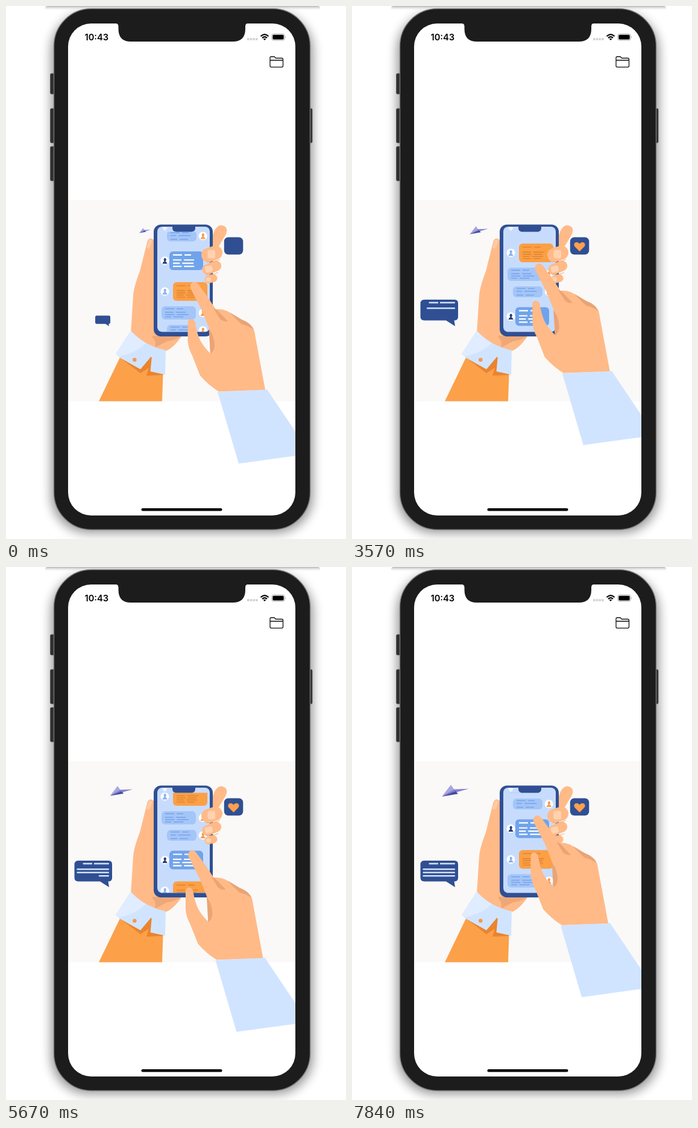
These frames come from a looping animation (564x884 px, 7910 ms). An HTML page:

```html
<!DOCTYPE html>
<html lang="en">
<head>
<meta charset="utf-8">
<title>Chat animation</title>
<style>
  html, body { margin: 0; width: 100%; height: 100%; overflow: hidden; background: #fff; }
  svg { display: block; }
  .time { font: 600 14.6px Inter, sans-serif; }
  .skin { fill: #ffba88; }
  .shade { fill: #eaa475; }
  .navy { fill: #304f93; }
  .cuff { fill: #d1e4ff; }
  .finger { stroke: #ffba88; stroke-linecap: round; }
  .line { stroke: #cfe1ff; stroke-width: 2.6; stroke-linecap: round; }
</style>
</head>
<body>
<svg width="564" height="884" viewBox="0 0 564 884">
  <defs>
    <filter id="blur" x="-20%" y="-20%" width="140%" height="140%"><feGaussianBlur stdDeviation="9"/></filter>
    <linearGradient id="top" x2="0" y2="1"><stop stop-color="#b5b5b5"/><stop offset="1" stop-color="#fff" stop-opacity="0"/></linearGradient>
    <clipPath id="stage"><path d="M103 29H480V793H103Z"/></clipPath>
    <clipPath id="glass"><path d="M251 374.5H338V540H251Z"/></clipPath>
  </defs>

  <!-- device -->
  <rect x="75" y="12" width="434" height="862" rx="62" opacity=".42" filter="url(#blur)"/>
  <rect x="65" width="456" height="8" rx="4" fill="url(#top)"/>
  <g fill="#303030" stroke="#555" stroke-width=".8">
    <rect x="73.5" y="112" width="8" height="34" rx="2"/>
    <rect x="73.5" y="170" width="8" height="57" rx="2"/>
    <rect x="73.5" y="233" width="8" height="57" rx="2"/>
    <rect x="500" y="170" width="8" height="57" rx="2"/>
  </g>
  <rect x="79.5" y="4.5" width="425" height="864" rx="62" fill="#1c1c1c" stroke="#777" stroke-width="1.4"/>
  <rect x="103" y="29" width="377" height="816" rx="38" fill="#fff"/>
  <path d="M182 28V29Q186.500 29 186.500 34V38Q186.500 59 207 59H376Q397 59 397 38V34Q397 29 401 29V28Z" fill="#1c1c1c"/>

  <!-- status bar -->
  <text class="time" x="130.5" y="57">10:43</text>
  <path d="M400 55H418" stroke="#d0d0d0" stroke-width="3.5" stroke-dasharray="3.5 1.2"/>
  <path d="M422.5 50.3Q429 44 435.5 50.3M425 53Q429 49.3 433 53" fill="none" stroke="#000" stroke-width="2.2"/>
  <path d="M426.7 54.6Q429 52.7 431.3 54.6L429 57Z"/>
  <rect x="440.8" y="46.3" width="21.4" height="10.6" rx="3" fill="none" stroke="#aaa"/>
  <rect x="442.3" y="47.8" width="18.4" height="7.6" rx="1.6"/>
  <path d="M463.3 50Q465 51.5 463.3 53.5Z" fill="#aaa"/>
  <path d="M438 99V86Q438 84 440 84H445L447.500 86.500H457.500Q459.500 86.500 459.500 88.500V99Q459.500 101.300 457.500 101.300H440Q438 101.300 438 99ZM438 90H459.500" fill="none" stroke="#111" stroke-width="1.3"/>
  <rect x="224.5" y="833" width="134" height="4.6" rx="2.3"/>

  <path d="M103 322H480V655.5H103Z" fill="#faf9f7"/>

  <!-- holding hand -->
  <path class="skin" d="M245 388Q238 382 234.500 390L222 440Q212 466 211 480L207 542L222 570L262 573Q276 570 291 548L260 520Z"/>
  <path d="M237 388Q242 386 243 390L238 402Q234 403 233 400Z" fill="#ffcba5"/>
  <path class="shade" d="M243 547H291Q280 555 268 556Q255 562 247 567Q250 556 243 550Z" opacity=".8"/>
  <path class="skin" d="M342 384Q347 364 357 363.5Q371 366 364 380L349 405L342 408Z"/>
  <path d="M189 583L154 655.5H259L260.5 610L236 590Z" fill="#fca04a"/>
  <path d="M189 583L223 609L237 600L233 613L261 612L240 580Z" fill="#ea842f"/>
  <path class="cuff" d="M207 538.500Q229 563 265 571L264 611.500L239.500 606L242 580L223 602.500L190 584L182 577Z"/>
  <path d="M207 538.500Q217 550 232 559Q216 575 189 581L182 577Z" fill="#e0ecff"/>
  <circle cx="213.3" cy="586.7" r="3.3" fill="#f39a50"/>

  <!-- handset -->
  <rect class="navy" x="245" y="362.5" width="98" height="185.5" rx="12"/>
  <rect x="251" y="366" width="87" height="174.5" rx="8" fill="#c7dcfd"/>
  <g clip-path="url(#glass)">
    <g id="chat"><g id="list"></g><use href="#list" y="156.5"/></g>
  </g>
  <path d="M276 365H314V368Q314 374.5 307 374.5H283Q276 374.5 276 368Z" class="navy"/>
  <path d="M263.5 373L259.5 369Q260 365.5 263.5 367Q267 365.5 267.5 369Z" fill="#edf4ff"/>
  <path class="finger" d="M335.5 413L347.5 409" stroke-width="23"/>
  <path class="finger" d="M334 437L348.5 431" stroke-width="17.5"/>
  <path class="finger" d="M336 453.5L344 451.5" stroke-width="13"/>
  <g fill="#ffd2b2">
    <rect x="334.5" y="404.500" width="12.500" height="14" rx="3"/>
    <rect x="330" y="431" width="12.500" height="10.500" rx="3" transform="rotate(-14 336 436)"/>
    <rect x="331.5" y="450" width="8.500" height="7" rx="3"/>
  </g>
  <path d="M332 424Q343 426 355 420M331 445Q341 447 352 442" fill="none" stroke="#efaa7b"/>

  <!-- floating items -->
  <g id="plane">
    <path d="M0 0L15 -19.5L21 -11Z" fill="#aaa5e2"/>
    <path d="M0 0L20 -12L45 -13L27 -8Z" fill="#8581d2"/>
    <path d="M0 0L23 -9L27 -4.5Z" fill="#3e509d"/>
  </g>
  <rect class="navy" x="361.8" y="383.5" width="31.5" height="28.7" rx="7"/>
  <path id="heart" d="M0 8L-8 0C-12 -6 -4 -10.5 0 -4.5C4 -10.5 12 -6 8 0Z" fill="#ff9f4e"/>
  <g id="bubble">
    <path class="navy" d="M120 487H170Q176 487 176 493V515.5Q176 521.5 169.5 521.5L171 531L156 521.5H120Q113.5 521.5 113.5 515V493.5Q113.5 487 120 487Z"/>
    <path class="line"/><path class="line"/><path class="line"/><path class="line"/>
    <path class="navy" d="M143 490H146V494.5H143Z"/>
  </g>

  <!-- tapping hand -->
  <g clip-path="url(#stage)"><g id="hand">
    <path class="cuff" d="M351 640L433 636L500 735.6V743.3L386 759Z"/>
    <path class="skin" d="M306 468C304 459 313 454 319 461.500Q334 481 348 503Q358 502 367 506L390 520Q412 528 413 545L430 636.500L353 639.500Q336 629 322 613L309 580Q302 567 301.500 555V527C301 517 312 517 314 526Q317 545 323 556Q330 568 339 576L337 535L325 505Z"/>
    <path class="shade" d="M336.5 535Q346 548 346 564Q345 573 339 577Z"/>
    <path class="shade" d="M344 501L351 505L368 523Q360 524 355 519ZM371 508L391 520Q407 526 411 537Q402 530 391 528Q382 520 371 508Z"/>
  </g></g>
</svg>
<script>
const LOOP = 7910, STEP = 70;
const $ = id => document.getElementById(id);
const lines = document.querySelectorAll('.line');

let seed = 7;
const random = () => (seed = seed * 16807 % 2147483647) / 2147483647;

// A chat bubble: a title row, then evenly spaced rows of two dashes
function message({ x, y, w, h, fill, ink, rows, weight, figure, avatarX }) {
  const row = (dy, a, b) => `M${x + 6} ${y + dy}h${a}m4 0h${b}`;
  let text = row(h * .19, 15, 11);
  for (let i = 0; i < rows; i++)
    text += row(h * (.46 + .34 * i / (rows - 1)), 9 + 7 * random(), 12 + 9 * random());
  return `<rect x="${x}" y="${y}" width="${w}" height="${h}" rx="6" fill="${fill}"/>
    <path d="${text}" stroke="${ink}" stroke-width="${weight}"/>
    <g transform="translate(${avatarX} ${y + h / 2})"><circle r="7" fill="#fff"/>
    <path d="M-4 5Q-3.5 2 -1 1L-2 -2Q-2 -4.5 .3 -4.5Q3 -4 2 -.5L1 1.2Q3.500 2 4 5Z" fill="${figure}"/></g>`;
}
const received = { avatarX: 263.5, h: 31 };
const sent = { avatarX: 326.7, fill: '#a3c5f8', ink: '#78a2e9', weight: 1.5, figure: '#f79b4b' };
$('list').innerHTML = [
  { ...sent, x: 267, y: 372.5, w: 49, h: 18, rows: 2 },
  { ...received, x: 271, y: 407, w: 56, fill: '#70a3eb', ink: '#fff', rows: 3, weight: 2.2, figure: '#293e79' },
  { ...received, x: 277, y: 458, w: 57, fill: '#fc9f45', ink: '#d9822f', rows: 4, weight: 1.3, figure: '#8bb0ee' },
  { ...sent, x: 258, y: 498, w: 57, h: 22, rows: 3 },
].map(message).join('');

// Progress from 0 to 1 between two times
const ramp = (t, from, to) => Math.max(0, Math.min(1, (t - from) / (to - from)));
const place = (id, transform) => $(id).setAttribute('transform', transform);

function draw(t) {
  // Two upward swipes drag the chat; the finger returns in between
  const swipe1 = ramp(t, 0, 1450), back = ramp(t, 3100, 4400), swipe2 = ramp(t, 4850, 7150);
  place('hand', `translate(${-5 * t / LOOP} ${-73 * swipe1 + 117 * back - 89.5 * swipe2})`);
  place('chat', `translate(0 ${-64 * swipe1 - 81 * swipe2})`);

  const flight = t / LOOP;
  place('plane', `translate(${221 - 72 * ramp(t, 1200, 7850)} ${376.5 + 4.3 * flight}) scale(${.42 + .58 * flight})`);
  place('heart', `translate(377.5 399) scale(${ramp(t, 1950, 2950)})`);
  place('bubble', `translate(171 531) scale(${.4 + .6 * ramp(t, 0, 840)}) translate(-171 -531)`);

  // Bubble text is written from right to left, line by line
  lines.forEach((line, i) => {
    const start = 890 + 1460 * i, p = ramp(t, start, start + 1400);
    const y = i ? 495.7 + 5.5 * i : 492, width = i ? 51 : 41;
    line.setAttribute('d', p ? `M169.7 ${y}h${-width * p}` : '');
  });
}

function tick() {
  draw(Math.floor(performance.now() % LOOP / STEP) * STEP);
  requestAnimationFrame(tick);
}
tick();
</script>
</body>
</html>
```
